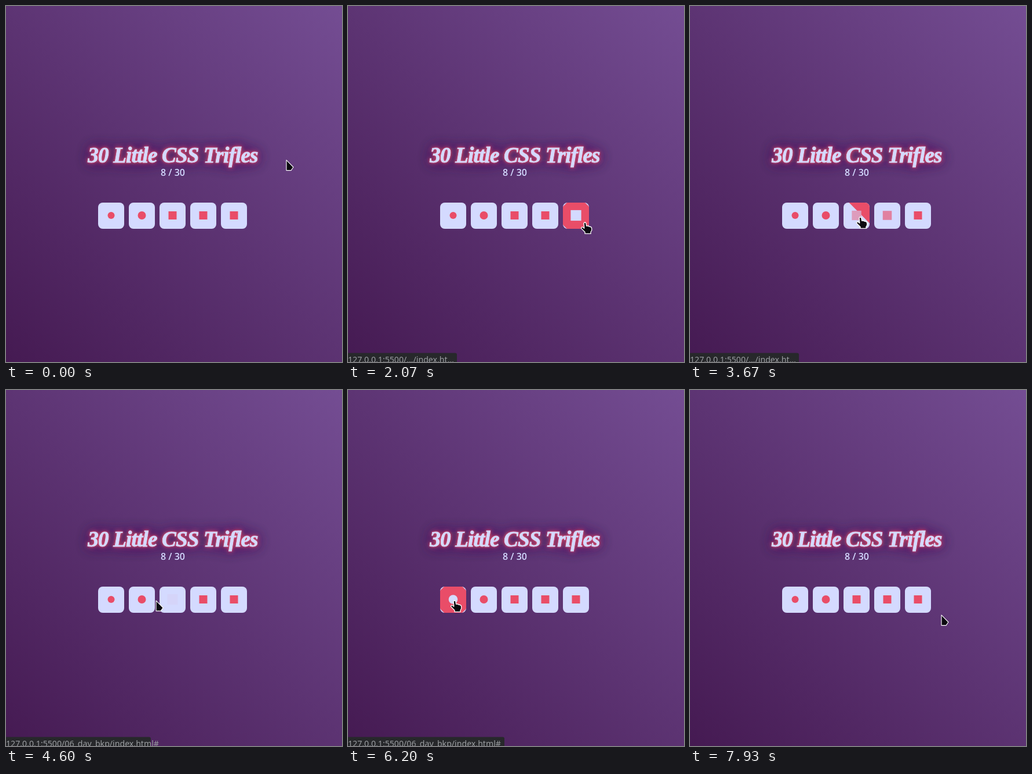
An HTML page for the animation above (8 s loop, 580 by 612 pixels).

```html
<!DOCTYPE html>
<html lang="en">
<head>
<meta charset="utf-8">
<title>Social buttons</title>
<style>
  html, body { margin: 0; width: 100%; height: 100%; overflow: hidden; }
  svg {
    display: block; width: 580px; height: 612px;
    background: linear-gradient(45deg, #451a52, #744d93);
  }
  #title {
    font: italic bold 37px "Liberation Serif", "Times New Roman", serif;
    letter-spacing: -.8px;
    fill: currentColor; stroke: currentColor; stroke-width: .9px;
  }
  #count { font: 600 16px "Open Sans", sans-serif; fill: #d4daff; }
  #status text { font: 14.15px "Noto Sans", sans-serif; fill: #9a9da1; }
</style>
</head>
<body>
<svg viewBox="0 0 580 612" xmlns="http://www.w3.org/2000/svg">
  <defs>
    <text id="title" x="288" y="268.5" text-anchor="middle">30 Little CSS Trifles</text>
    <filter id="near" x="-20%" y="-100%" width="140%" height="300%"><feGaussianBlur stdDeviation="1.8"/></filter>
    <filter id="mid" x="-20%" y="-100%" width="140%" height="300%"><feGaussianBlur stdDeviation="4.5"/></filter>
    <filter id="far" x="-20%" y="-150%" width="140%" height="400%">
      <feGaussianBlur stdDeviation="12" result="b"/>
      <feMerge><feMergeNode in="b"/><feMergeNode in="b"/></feMerge>
    </filter>
    <clipPath id="tile"><rect width="45" height="45" rx="8"/></clipPath>
  </defs>

  <use href="#title" color="#47195a" filter="url(#far)"/>
  <use href="#title" color="#e94d68" filter="url(#mid)"/>
  <use href="#title" color="#e94d68" filter="url(#near)"/>
  <use href="#title" color="#d4daff"/>
  <text id="count" x="288" y="292" text-anchor="middle">8 / 30</text>

  <g id="tiles"></g>

  <g id="status">
    <path id="bubble" fill="#27282b"/>
    <text id="link" x="0" y="613"></text>
  </g>

  <g id="cursor" stroke="#fff" stroke-linejoin="round" fill="#0c0a10">
    <path id="arrow" stroke-width="1.1" d="M0 .8V18.6H8.1L12 13Z"/>
    <path id="hand" stroke-width="1.3" d="M-1.9 1.2Q0 -1.2 1.8 1.2L2.6 6.2Q6 5.6 7 7Q10.6 7 11.6 9.6L11.8 13.5L10 16.5V19.4H0V16.8L-6.3 10.4Q-6.6 7.6 -3.8 8.2L-1.2 10.2Z"/>
  </g>
</svg>
<script>
const LOOP = 8000, SIZE = 45, TOP = 338, SWEEP = 700, FADE = 500;
const LIGHT = [212, 218, 255], PINK = [233, 77, 104];
const $ = id => document.getElementById(id);
const clamp = v => Math.max(0, Math.min(1, v));
const mix = (a, b, k) => a + (b - a) * k;
const easeOut = k => 1 - (1 - k) ** 3;

// Pointer moves: start, duration, end x, end y
const moves = [
  [70, 1150, 409, 372], [2243, 330, 338, 371], [3290, 350, 294, 363],
  [4500, 400, 234, 360], [5445, 330, 184, 362], [6828, 347, 278, 382.9],
  [7380, 250, 392, 376], [7640, 200, 434, 386]
];

function pointer(t) {
  let x = 484, y = 264;
  for (const [start, time, toX, toY] of moves) {
    const k = easeOut(clamp((t - start) / time));
    x = mix(x, toX, k);
    y = mix(y, toY, k);
  }
  return [x, y];
}

// CSS "ease" curve, solved by bisection
function ease(x) {
  const bez = (p, q, s) => 3 * p * s * (1 - s) ** 2 + 3 * q * s * s * (1 - s) + s ** 3;
  let lo = 0, hi = 1;
  for (let i = 0; i < 20; i++) {
    const m = (lo + hi) / 2;
    if (bez(.25, .25, m) < x) lo = m; else hi = m;
  }
  return bez(.1, 1, lo);
}

// Hover intervals follow from the pointer's path
function findHovers(left) {
  const hovers = [];
  let start = -1;
  for (let t = 0; t <= LOOP; t += 2) {
    const [x, y] = pointer(t);
    const on = x > left && x < left + SIZE && y > TOP && y < TOP + SIZE;
    if (on && start < 0) start = t;
    if (!on && start >= 0) { hovers.push([start, t]); start = -1; }
  }
  return hovers;
}

function makeTile(i) {
  const x = 159 + 53 * i;
  const mark = i < 2
    ? `<circle r="${6 + i}"/>`
    : '<rect x="-7" y="-7" width="14" height="14"/>';
  const g = document.createElementNS('http://www.w3.org/2000/svg', 'g');
  g.setAttribute('transform', `translate(${x} ${TOP})`);
  g.setAttribute('clip-path', 'url(#tile)');
  g.innerHTML = `<rect width="45" height="45" fill="rgb(${LIGHT})"/>
    <rect x="-27" y="-27" width="54" height="54" fill="rgb(${PINK})"/><g>${mark}</g>`;
  $('tiles').append(g);
  return { sweep: g.children[1], icon: g.children[2], hovers: findHovers(x) };
}

const tiles = Array.from({ length: 5 }, (_, i) => makeTile(i));
const times = tiles.flatMap(tile => tile.hovers).flat();
const first = Math.min(...times), last = Math.max(...times);

function hoverLevel(hovers, t) {
  let v = 0, prev = 0;
  for (const [start, stop] of hovers) {
    if (start >= t) break;
    const end = Math.min(stop, t);
    v = clamp(clamp(v - (start - prev) / FADE) + (end - start) / FADE);
    prev = end;
  }
  return clamp(v - (t - prev) / FADE);
}

// The slab enters from the lower left, overshoots, then settles
function sweepOffset(k) {
  if (k < .5) return mix(-1, .57, ease(k * 2));
  return mix(.57, 0, ease(clamp(k * 2 - 1)));
}

function drawTile(tile, t) {
  const hover = tile.hovers.find(([start, end]) => t >= start && t < end);
  tile.sweep.setAttribute('visibility', hover ? 'visible' : 'hidden');
  if (hover) {
    const d = SIZE * sweepOffset((t - hover[0]) / SWEEP);
    tile.sweep.setAttribute('transform', `translate(${22.5 + d} ${22.5 - d}) rotate(45)`);
  }
  const v = hoverLevel(tile.hovers, t);
  const color = PINK.map((c, i) => Math.round(mix(c, LIGHT[i], v)));
  tile.icon.setAttribute('fill', `rgb(${color})`);
  tile.icon.setAttribute('transform', `translate(22.5 22) scale(${1 + .3 * v})`);
  return !!hover;
}

function drawStatus(t) {
  const shown = Math.min(clamp((t - first - 60) / 200), 1 - clamp((t - last - 30) / 150));
  const wide = clamp((t - 4450) / 200);
  $('status').setAttribute('opacity', shown);
  $('bubble').setAttribute('d', `M0 596.5H${mix(185, 267, wide)}q3 0 3 3V612H0Z`);
  $('link').textContent = wide > 0
    ? '127.0.0.1:5500/06_day_bkp/index.html#'
    : '127.0.0.1:5500/…/index.ht…';
}

function draw(t) {
  const hovering = tiles.map(tile => drawTile(tile, t)).some(Boolean);
  drawStatus(t);
  const [x, y] = pointer(t);
  $('cursor').setAttribute('transform', `translate(${x} ${y})`);
  $('hand').setAttribute('visibility', hovering ? 'visible' : 'hidden');
  $('arrow').setAttribute('visibility', hovering ? 'hidden' : 'visible');
}

const began = performance.now();
function tick() {
  draw((performance.now() - began) % LOOP);
  requestAnimationFrame(tick);
}
tick();
</script>
</body>
</html>
```
